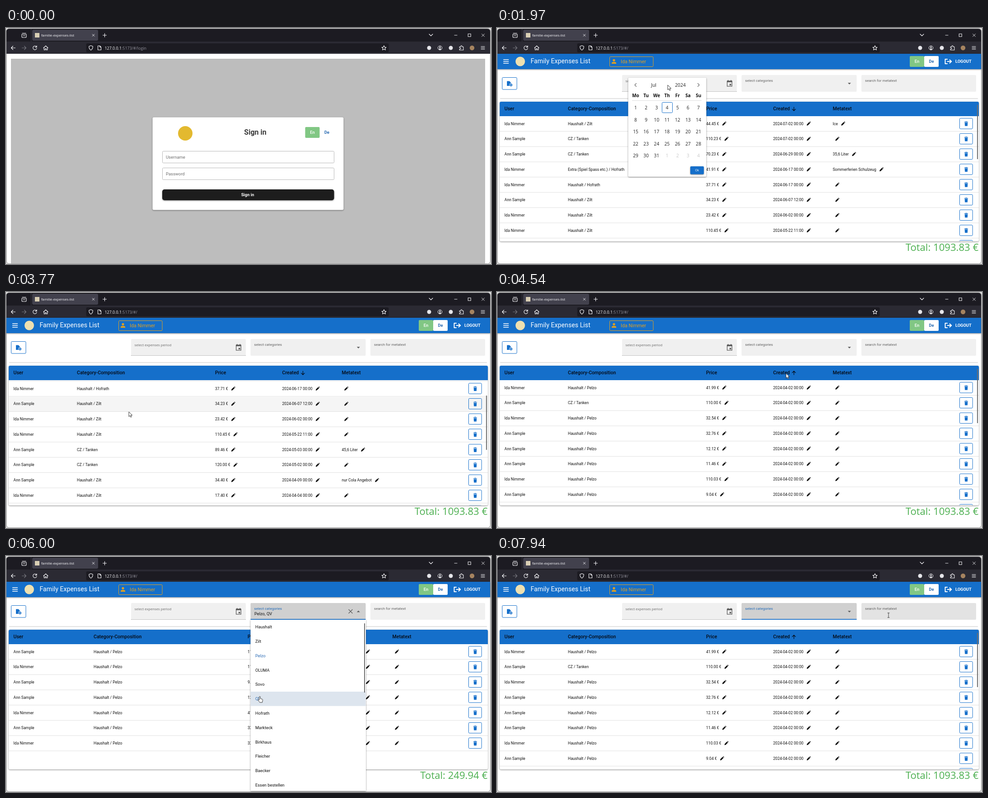
An HTML page that plays this animation: 1074 by 522 pixels, repeating every 8000 ms.

```html
<!DOCTYPE html>
<html lang="en">
<head>
<meta charset="utf-8">
<title>Family Expenses List</title>
<style>
html, body { margin: 0; width: 100%; height: 100%; overflow: hidden; background: #dadada; }
svg { display: block; width: 1074px; height: 522px; font-family: Roboto, Arial, sans-serif; white-space: pre; }
.ui { font-family: "Open Sans", "Noto Sans", sans-serif; }
.lift { filter: drop-shadow(0 1px 1.5px #0007); }
</style>
</head>
<body>
<svg id="stage" viewBox="0 0 1074 522"></svg>
<script>
const BLUE = '#156fca', INK = '#111', LENGTH = 8000, STEP = 112.857, ROW = 33.75, ITEM = 31.78;
const stage = document.getElementById('stage');
const pen = document.createElement('canvas').getContext('2d');

const rect = (x, y, w, h, fill, more = '') =>
  `<rect x="${x}" y="${y}" width="${w}" height="${h}" fill="${fill}" ${more}/>`;
const frame = (x, y, w, h, color, r = 2) => rect(x, y, w, h, 'none', `stroke="${color}" rx="${r}"`);
const circle = (x, y, r, fill, more = '') => `<circle cx="${x}" cy="${y}" r="${r}" fill="${fill}" ${more}/>`;
const text = (x, y, s, size, fill = INK, more = '') =>
  `<text x="${x}" y="${y}" font-size="${size}" fill="${fill}" ${more}>${s}</text>`;
const MID = 'text-anchor="middle"', BOLD = 'font-weight="700"', MEDIUM = 'font-weight="500"', UI = 'class="ui"';
const line = (x, y, d, color = '#fbfbfe', width = 1.1) =>
  `<path transform="translate(${x} ${y})" d="${d}" fill="none" stroke="${color}" stroke-width="${width}" stroke-linecap="round" stroke-linejoin="round"/>`;
const shape = (x, y, d, fill, more = '') => `<path transform="translate(${x} ${y})" d="${d}" fill="${fill}" ${more}/>`;

// Linear path through [time, ...values] points
function along(points, t) {
  const i = points.findIndex(p => p[0] > t);
  if (i < 0) return points.at(-1).slice(1);
  if (i === 0) return points[0].slice(1);
  const a = points[i - 1], b = points[i], f = (t - a[0]) / (b[0] - a[0]);
  return a.slice(1).map((v, j) => v + (b[j + 1] - v) * f);
}

const USERS = ['Ida Nimmer', 'Ann Sample'];
const ITEMS = ['Haushalt', 'Zilt', 'Pelzo', 'OLUMA', 'Sovo', 'QV', 'Hofrath', 'Markteck', 'Birkhaus',
  'Fleicher', 'Baecker', 'Essen bestellen'];
const KINDS = { z: 'Haushalt / Zilt', t: 'CZ / Tanken', e: 'Extra (Spiel Spass etc.) / Hofrath',
  h: 'Haushalt / Hofrath', p: 'Haushalt / Pelzo' };
const rows = `0|z|44.45|07-02 00|Ice
1|t|110.23|07-02 00|
1|t|70.23|06-29 00|35,6 Liter
0|e|41.91|06-17 00|Sommerferien Schulzeug
0|h|37.71|06-17 00|
1|z|34.23|06-07 12|
0|z|23.42|06-02 00|
0|z|110.45|05-22 11|
1|t|89.46|05-03 00|45,6 Liter
1|t|120.00|05-02 00|
1|z|34.40|04-09 00|nur Cola Angebot
0|z|17.40|04-04 00|
0|p|41.99|04-02 00|
1|t|110.00|04-02 00|
0|p|32.54|04-02 00|
1|p|32.76|04-02 00|
1|p|12.12|04-02 00|
1|p|11.46|04-02 00|
0|p|110.03|04-02 00|
1|p|9.04|04-02 00|`.split('\n').map(s => s.split('|'));
const ascending = [...rows.slice(12), ...rows.slice(0, 12).reverse()];
const filtered = [5, 6, 7, 4, 0, 3, 2].map(i => ascending[i]);

const POINTER = [[40, 600, 420], [150, 480, 286], [490, 480, 286], [600, 470, 323], [800, 470, 323],
  [930, 426, 370], [1400, 426, 370], [1730, 390, 122], [1958, 378, 126], [2220, 377, 178], [2320, 377, 178],
  [2540, 443, 315], [2660, 443, 315], [3100, 497, 122], [3420, 497, 122], [3530, 400, 122], [3764, 272, 265],
  [4200, 272, 265], [4400, 640, 180], [4560, 640, 180], [4780, 660, 122], [4900, 660, 122], [5231, 571, 223.5],
  [5450, 571, 223.5], [5700, 562, 312], [5900, 562, 312], [6400, 562.5, 218], [6720, 562.5, 218],
  [7050, 763, 122], [7300, 763, 122], [7940, 867, 131]];
const SCROLL = [[3540, 0], [3764, 132.5], [3960, 398], [4020, 398], [4200, 0]];

const CROSS = 'M-3-3 3 3M3-3-3 3';

function browser(login) {
  const bright = '#fbfbfe';
  return rect(1, 1.5, 1071.5, 520, '#fff', 'rx="6" stroke="#8a8a8a"')
    + '<path d="M1 57V8q0-6 6-6H1066q6 0 6 6V57Z" fill="#2b2a33"/>'
    + '<path d="M1 30V8q0-6 6-6H1066q6 0 6 6V30Z" fill="#1c1b22"/>'
    + rect(55, 2, 1, 28, '#3a3944') + rect(58, 4, 146, 24, '#42414d', 'rx="3"')
    + line(40, 16, 'M-5-2H5V3q0 2-2 2H-3q-2 0-2-2ZM-4-4.5H4M-2 1H2')
    + rect(64, 11, 10, 10, '#d9cfb4')
    + text(78, 19.3, 'familie-expenses-list', 7.7, bright, UI)
    + line(193.5, 16, 'M-2.3-2.3 2.3 2.3M2.3-2.3-2.3 2.3', bright, .9)
    + line(218.5, 16, 'M-4 0H4M0-4V4') + line(941, 15.5, 'M-4-2 0 2 4-2')
    + line(996, 16, 'M-3 0H3', bright, .9) + frame(1023.2, 13, 6, 6, bright, 0)
    + line(1056.5, 16, CROSS, bright, .9)
    + line(16, 44, 'M4.5 0H-4.5M-.5-4-4.5 0-.5 4') + line(40, 44, 'M-4.5 0H4.5M.5-4 4.5 0 .5 4', '#77767f')
    + line(64, 44, 'M4 1A4.2 4.2 0 1 1 3-3M4-4.8V-1.6H.8')
    + line(88, 44, 'M-5 0 0-4.7 5 0M-3.7-1V4.5H-1V1.5H1V4.5H3.7V-1')
    + rect(177.5, 34, 670, 20, '#1c1b22', 'rx="3"')
    + line(188, 44, 'M0-5 4.2-3.4Q4.3 3 0 5-4.3 3-4.2-3.4Z')
    + line(207, 44, 'M-3.5-4.5H.8L3.5-1.8V4.5H-3.5ZM.8-4.5V-1.8H3.5')
    + `<text x="218.5" y="47.6" font-size="8.87" class="ui" fill="${bright}">127.0.0.1<tspan fill="#95949f">:5173/#/${login ? 'login' : ''}</tspan></text>`
    + line(837, 44, 'M0-5 1.5-1.6 5-1.3 2.4 1 3.2 4.6 0 2.7-3.2 4.6-2.4 1-5-1.3-1.5-1.6Z')
    + circle(937, 44, 4.5, '#e6e6ea')
    + circle(961, 44, 4.6, 'none', `stroke="${bright}"`) + circle(961, 42.6, 1.6, bright)
    + shape(961, 44, 'M-2.8 2.8Q0-.6 2.8 2.8Q0 4.6-2.8 2.8Z', bright)
    + circle(985, 44, 4.5, '#e6e6ea')
    + line(1008.5, 44, 'M-4.3-2.5H-1.5V-4Q0-6 1.5-4V-2.5H4.3V4.7H-4.3V2.6Q-1.4 2.2-1.4 1T-4.3-.5Z')
    + circle(1032, 44, 5.2, '#a5835f') + line(1056, 44, 'M-4-3H4M-4 0H4M-4 3H4');
}

function language(x, y, boxed) {
  return rect(x, y, 32, 24, '#81c784', 'rx="2"') + (boxed ? rect(x + 32, y, 32, 24, '#fff', 'rx="2"') : '')
    + text(x + 16, y + 15.3, 'En', 9.4, '#fff', MID + MEDIUM) + text(x + 48, y + 15.3, 'De', 9.4, '#2a6cb3', MID + ' ' + BOLD);
}

function loginPage(t) {
  const user = 'ida.nimmer'.slice(0, Math.max(0, (t - 190) / 32));
  const pass = '•'.repeat(Math.min(8, Math.max(0, (t - 590) / 28)));
  const input = (y, hint, value, focus) => frame(346.5, y + .5, 380, 26, focus ? BLUE : '#b8b8b8')
    + text(354, y + 17, value || hint, 9.45, value ? '#222' : '#6e6e6e');
  return rect(11, 68, 1050, 453.5, '#bdbdbd') + rect(324.5, 197.5, 423, 205, '#fff', 'rx="3" class="lift"')
    + circle(397, 233, 16, '#e3b92f') + text(552, 236, 'Sign in', 16, '#3a3a3a', MID + ' ' + BOLD)
    + language(662.5, 219, false)
    + input(272, 'Username', user, t > 140 && t < 580) + input(309, 'Password', pass, t > 580 && t < 900)
    + rect(346, 357, 380.5, 24, '#1d1d1d', 'rx="5" class="lift"')
    + text(535, 371.8, 'Sign in', 9.3, '#fff', MID + ' ' + BOLD);
}

function appBar() {
  const amber = '#e2a01f';
  return rect(1, 57, 1071, 34, BLUE, 'class="lift"') + line(20, 74, 'M-5.5-4H5.5M-5.5 0H5.5M-5.5 4H5.5', '#fff', 1.4)
    + circle(51.5, 74, 10.5, '#eee0b0') + text(74.5, 78.3, 'Family Expenses List', 14, '#fff', 'letter-spacing=".1"')
    + frame(249.5, 63.5, 96.5, 22, amber) + circle(259, 71.3, 2.6, amber)
    + shape(259, 74, 'M-5 5V3Q-4.5 1 0 1T5 3V5Z', amber) + text(274, 77.7, USERS[0], 10.8, amber);
}

function barButtons() {
  return language(914, 62, true) + line(999.5, 74, 'M-2.5-5H-7V5H-2.5M-2 0H6M3-3.5 6.8 0 3 3.5', '#fff', 2)
    + text(1015, 77.2, 'LOGOUT', 9.25, '#fff', BOLD);
}

function filters(t, value) {
  const focus = t > 4740, open = focus && t < 7480, period = t > 2260 && t < 3250;
  const tint = focus ? '#1f69b8' : '#5f5f5f';
  return frame(11.5, 109.5, 32.5, 26.5, BLUE)
    + shape(26.5, 123, 'M-4.5-5.5H1L4-2.5V5H-4.5Z', BLUE) + circle(31, 126, 3.7, '#fff') + circle(31, 126, 3, BLUE)
    + line(31, 126, 'M-1.4 0H1.4M0-1.4V1.4', '#fff', .7)
    + rect(277, 104, 254, 37, '#f0f0f0', 'rx="2"')
    + '<path d="M277 140.5H531" stroke="#999" stroke-dasharray="1.6 1.4"/>'
    + text(284.5, 119.5, 'select expenses period', 7.7, '#666', UI)
    + (period ? text(284.5, 132, '2024-07-04', 9.2) + line(497, 122.5, CROSS, '#555') : '')
    + shape(515, 122.5, 'M-6-6H-4V-7.5H-2.5V-6H2.5V-7.5H4V-6H6V7H-6ZM-4.7-2.5V5.7H4.7V-2.5ZM0 1H3.5V4.5H0Z', '#5c5c5c', 'fill-rule="evenodd"')
    + rect(541.5, 104, 255, 37, focus ? '#d0d0d0' : '#f0f0f0', 'rx="2"')
    + (focus ? rect(541.5, 139.3, 255, 1.7, BLUE) : '')
    + text(549.5, 118.5, 'select categories', 8.1, tint)
    + text(550, 131, value, 9.3) + (value ? line(763, 122.5, 'M-4-4 4 4M4-4-4 4', '#555', 1.2) : '')
    + shape(780.3, 122.8, open ? 'M-3.5 1.5H3.5L0-2Z' : 'M-3.5-1.5H3.5L0 2Z', '#5c5c5c')
    + rect(807, 104, 254, 37, t > 7890 ? '#e3e3e3' : '#f0f0f0', 'rx="2"')
    + text(815, 118.5, 'search for metatext', 8.1, '#5f5f5f')
    + rect(7, 155.5, 1058, 1, '#c6c6c6');
}

function table(list, narrow, up, scroll, hoverY) {
  const cols = narrow ? [16.5, 157, 463, 611.5, 743.5] : [16.5, 194, 535, 722.5, 855.5];
  const heads = ['User', 'Category-Composition', 'Price', 'Created', 'Metatext'];
  const cell = (x, y, s, edit) => {
    const pencil = edit ? shape(x + (s ? pen.measureText(s).width + 11.5 : 10), y - 3.1,
      'M-4.3 4.3-3.7 1.5 1.2-3.4 3.4-1.2-1.5 3.7ZM1.9-4.1 2.8-4.7Q4.4-4.3 4.7-2.8L4.1-1.9Z', INK) : '';
    return text(x, y, s, 8.65) + pencil;
  };
  pen.font = '8.65px Roboto, Arial, sans-serif';
  const over = hoverY ? Math.floor((hoverY - 197 + scroll) / ROW) : -1;
  const body = list.map(([user, kind, price, date, meta], i) => {
    const top = 194.8 + i * ROW - scroll, y = top + 19.8;
    if (top > 472 || top < 150) return '';
    const texts = [USERS[user], KINDS[kind], price + ' €', `2024-${date}:00`, meta];
    return (i === over ? rect(6, top, 1061, ROW, '#f5f5f5') : '') + rect(6, top + ROW - .5, 1061, 1, '#e0e0e0')
      + texts.map((s, c) => cell(cols[c], y, s, c > 1)).join('')
      + frame(1024.5, top + 4.8, 28.7, 23.5, BLUE)
      + shape(1039, top + 17, 'M-4-4.5H-1.5V-5.3H1.5V-4.5H4V-3.3H-4ZM-3.4-2.5H3.4L2.9 5H-2.9Z', BLUE);
  }).join('');
  return rect(6, 163, 1061, 309, '#fff', 'rx="3" class="lift"')
    + `<clipPath id="body"><rect x="6" y="194.5" width="1061" height="277"/></clipPath><g clip-path="url(#body)">${body}</g>`
    + '<path d="M6 195V166q0-3 3-3H1064q3 0 3 3V195Z" fill="' + BLUE + '"/>'
    + heads.map((s, c) => text(cols[c], 182.2, s, 10.55, '#050a14', MEDIUM)).join('')
    + line(cols[3] + 46, 179, up ? 'M0 4V-4M-3.7-.3 0-4 3.7-.3' : 'M0-4V4M-3.7 .3 0 4 3.7 .3', '#050a14', 1.2)
    + (narrow ? rect(1063, 170 + scroll * .445, 2, 120, '#6f6f6f') : '')
    + text(1066.5, 493, `Total: ${narrow ? '1093.83' : '249.94'} €`, 22.1, '#4caf50', UI + ' text-anchor="end"');
}

function calendar(t) {
  const x = c => 307 + 23.2 * c, picked = t > 2260;
  let out = rect(290.5, 110, 173, 219, '#fff', 'rx="2" class="lift"')
    + line(306.5, 126, 'M2-3.5-1.5 0 2 3.5', '#666') + line(446.5, 126, 'M-2-3.5 1.5 0-2 3.5', '#666')
    + text(347, 129.7, 'Jul', 10.3, '#222', MID) + text(406, 129.7, '2024', 10.3, '#222', MID)
    + rect(299, 160, 154, 1, '#ddd')
    + rect(365.5, 164.5, 23, 23, picked ? BLUE : '#fff', `rx="2" stroke="${BLUE}"`);
  'Mo Tu We Th Fr Sa Su'.split(' ').forEach((d, c) => out += text(x(c), 153, d, 10, INK, MID + ' ' + BOLD));
  for (let i = 0; i < 35; i++) {
    const color = i > 30 ? '#c8c8c8' : i === 3 && picked ? '#fff' : '#222';
    out += text(x(i % 7), 180 + 26.5 * Math.floor(i / 7), i % 31 + 1, 10.2, color, MID);
  }
  return `<g class="ui">${out}${rect(428, 306, 30, 17.5, BLUE, 'rx="2" class="lift"')}${text(443, 317.3, 'Ok', 6.6, '#fff', MID)}</g>`;
}

function menu(chosen, y) {
  const over = Math.floor((y - 138) / ITEM);
  return rect(541.5, 141, 255.5, 378.5, '#fff', 'class="lift"')
    + ITEMS.map((s, i) => {
      const on = chosen.includes(s), mid = 157 + ITEM * i;
      return (i === over ? rect(541.5, mid - ITEM / 2, 255, ITEM, on ? '#dde5ee' : '#dadada') : '')
        + text(552, mid + 3.3, s, 9.3, on ? '#2c6cb5' : INK);
    }).join('') + rect(793, 149, 2, 153, '#6f6f6f');
}

function pointer(t, [x, y]) {
  const edge = 'stroke="#222" stroke-width=".9" stroke-linejoin="round"';
  if (t > 7850 || t > 140 && t < 800) return line(x, y, 'M-2-5H2M-2 5H2M0-5V5', '#333', .9);
  if (t > 4800 && t < 7480 || t > 800 && t < 1100)
    return shape(x, y, 'M-1.3 1Q0-1 1.3 1V5.2L5.3 6.2Q6.8 6.7 6.5 8.3L5.5 13.5H0L-3.6 8.8Q-4 7-2.6 7.2L-1.3 8.5Z', '#fff', edge);
  return shape(x, y, 'M0 0V10.6L2.5 8.3 4.1 12 6 11.2 4.4 7.6H7.6Z', '#fff', edge);
}

function picture(t) {
  const at = along(POINTER, t), cursor = t ? pointer(t, at) : '';
  if (t < 1100) return browser(true) + loginPage(t) + cursor;

  const loading = t < 1450, empty = loading || t > 2600 && t < 3330 || t > 6750 && t < 7370;
  const narrow = t < 5300 || t > 6750, sorted = t > 4420, open = t > 4740 && t < 7480;
  const first = t > 5300 && t < 6650, second = t > 5760 && t < 7220;
  const value = [first && 'Pelzo', second && 'QV'].filter(Boolean).join(', ');
  const hoverY = !open && at[1] > 197 && at[1] < 470 && t > 3330 ? at[1] : 0;
  const list = !narrow ? filtered : sorted ? ascending : rows;

  let out = browser(false) + appBar() + filters(t, value);
  if (loading) out += rect(1, 57, 1071, 464, '#000', 'opacity=".32"');
  out += barButtons();
  out += empty
    ? text(6, 184.5, 'No expenses available.', 22.5, loading ? '#cb382e' : '#f44336', 'letter-spacing=".15"')
    : table(list, narrow, sorted, along(SCROLL, t)[0], hoverY);
  if (loading && t > 1250)
    out += t < 1350 ? line(554, 300, 'M-1.6-.8 2 1.2', '#fff', 1.8) : line(537, 300, 'M17 0A17 17 0 0 1-8 15', '#fff', 2.4);
  if (t > 1740 && t < 2600) out += calendar(t);
  if (open) out += menu([t > 5300 && t < 6750 && 'Pelzo', second && 'QV'], at[1]);
  return out + cursor;
}

const start = performance.now();
let shown;
function tick() {
  const step = Math.floor(((performance.now() - start) % LENGTH - 25) / STEP);
  if (step !== shown) {
    shown = step;
    stage.innerHTML = picture(step < 0 ? 0 : 40 + step * STEP);
  }
  requestAnimationFrame(tick);
}
tick();
</script>
</body>
</html>
```
